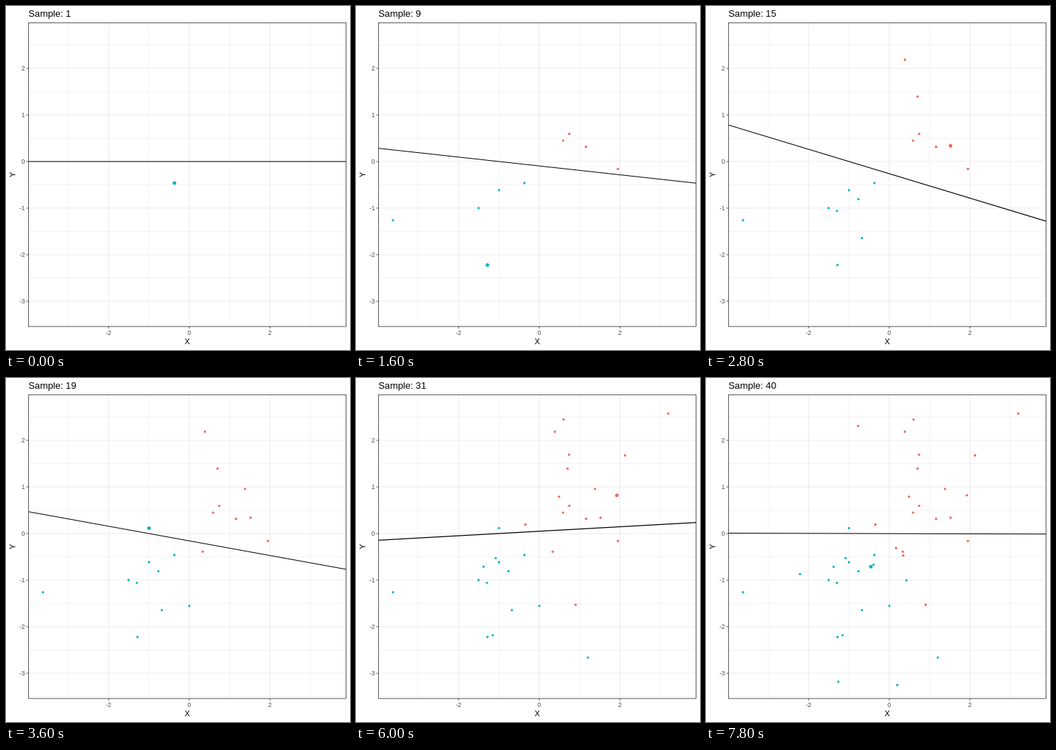
Animation, 480 px wide and 480 px high, one loop 8 s. Source, as an HTML page:

```html
<!DOCTYPE html>
<html lang="en">
<head>
<meta charset="utf-8">
<title>Online classifier</title>
<style>
  html, body { margin: 0; width: 100%; height: 100%; overflow: hidden; background: #fff; }
  svg { display: block; width: 100%; height: 100%; font-family: "Liberation Sans", Arial, sans-serif; }
  .grid { stroke: #ebebeb; }
  .tick { stroke: #333; stroke-width: .8; }
  .label { font-size: 8.8px; fill: #4d4d4d; }
  .axis { font-size: 11px; text-anchor: middle; }
</style>
</head>
<body>
<svg viewBox="0 0 480 480">
  <clipPath id="panel"><rect x="31.4" y="23.4" width="443.1" height="423.8"/></clipPath>
  <g id="axes"></g>
  <g clip-path="url(#panel)">
    <g id="points"></g>
    <line id="boundary" x1="31" x2="475" stroke="#000" stroke-width="1.07"/>
  </g>
  <rect x="31.4" y="23.4" width="443.1" height="423.8" fill="none" stroke="#333" stroke-width=".8"/>
  <text id="title" x="31.3" y="15" font-size="13.2"></text>
  <text class="axis" x="253" y="472">X</text>
  <text class="axis" transform="translate(13.2 235.4) rotate(-90)">Y</text>
</svg>
<script>
const RED = '#f3655d', TEAL = '#10b5ba';
const STEP = 200;
const PIVOT = { x: 199.4, y: 217 };
const toX = v => 255.7 + 56.3 * v;
const toY = v => 217 - 65 * v;

// Samples in order of arrival: colour and stage position
const samples = [
  [TEAL, 235, 247], [RED, 297.5, 178.3], [TEAL, 51.6, 298.9], [RED, 321, 196.5],
  [TEAL, 171, 282], [RED, 365.5, 227.3], [TEAL, 199.5, 257], [RED, 289, 187.8],
  [TEAL, 183.4, 361.5], [RED, 277.5, 75], [TEAL, 212.7, 269.6], [RED, 295.2, 126.3],
  [TEAL, 182.6, 285.8], [TEAL, 217.5, 323.9], [RED, 341.2, 195], [RED, 333.5, 154.8],
  [TEAL, 255.8, 317.9], [RED, 274.5, 242.3], [TEAL, 199.5, 209.4], [RED, 297.3, 107],
  [TEAL, 194.9, 251.3], [RED, 306.4, 316.4], [TEAL, 178, 263.3], [RED, 375.3, 108],
  [RED, 435.7, 49.6], [RED, 289.6, 57.8], [TEAL, 323.5, 390.1], [RED, 236.3, 204.5],
  [TEAL, 190.7, 358.8], [RED, 283.2, 165.6], [RED, 364, 163.7], [RED, 212.2, 66.8],
  [TEAL, 131.2, 273.6], [TEAL, 266.7, 428.4], [RED, 265.2, 237.3], [TEAL, 279.7, 282.3],
  [RED, 275.3, 247.7], [TEAL, 184.6, 423.9], [TEAL, 233.7, 260.6], [TEAL, 230, 263.3]
];

// Boundary slope at key sample counts
const slopes = [[1, 0], [9, .1095], [15, .3025], [19, .1815], [25, -.0748], [31, -.0557], [40, .0027]];

const byId = id => document.getElementById(id);

function add(parent, tag, attrs, text = '') {
  const node = document.createElementNS(parent.namespaceURI, tag);
  for (const key in attrs) node.setAttribute(key, attrs[key]);
  node.textContent = text;
  return parent.appendChild(node);
}

function drawAxes() {
  const axes = byId('axes');
  const line = (cls, x1, y1, x2, y2, width) =>
    add(axes, 'line', { class: cls, x1, y1, x2, y2, ...(width && { 'stroke-width': width }) });

  for (let v = -3; v <= 3; v++) {
    const x = toX(v), major = v % 2 === 0;
    line('grid', x, 23, x, 447, major ? 1.07 : .6);
    if (!major) continue;
    line('tick', x, 447, x, 450);
    add(axes, 'text', { class: 'label', x, y: 458.6, 'text-anchor': 'middle' }, v);
  }
  for (let v = -3.5; v <= 2.5; v += .5) {
    const y = toY(v), major = Number.isInteger(v);
    line('grid', 31, y, 475, y, major ? 1.07 : .6);
    if (!major) continue;
    line('tick', 28.4, y, 31.2, y);
    add(axes, 'text', { class: 'label', x: 26.5, y: y + 3.2, 'text-anchor': 'end' }, v);
  }
}

function slopeAt(count) {
  const i = Math.max(1, slopes.findIndex(([n]) => n >= count));
  const [n0, s0] = slopes[i - 1], [n1, s1] = slopes[i];
  return s0 + (s1 - s0) * (count - n0) / (n1 - n0);
}

drawAxes();
const dots = samples.map(([fill, cx, cy]) => add(byId('points'), 'circle', { fill, cx, cy }));
const boundary = byId('boundary');

function draw(time) {
  const count = Math.floor(time / STEP) % samples.length + 1;
  const slope = slopeAt(count);
  byId('title').textContent = 'Sample: ' + count;
  dots.forEach((dot, i) => dot.setAttribute('r', i >= count ? 0 : i === count - 1 ? 2.5 : 1.65));
  boundary.setAttribute('y1', PIVOT.y + slope * (31 - PIVOT.x));
  boundary.setAttribute('y2', PIVOT.y + slope * (475 - PIVOT.x));
}

function tick() {
  draw(performance.now());
  requestAnimationFrame(tick);
}
tick();
</script>
</body>
</html>
```
